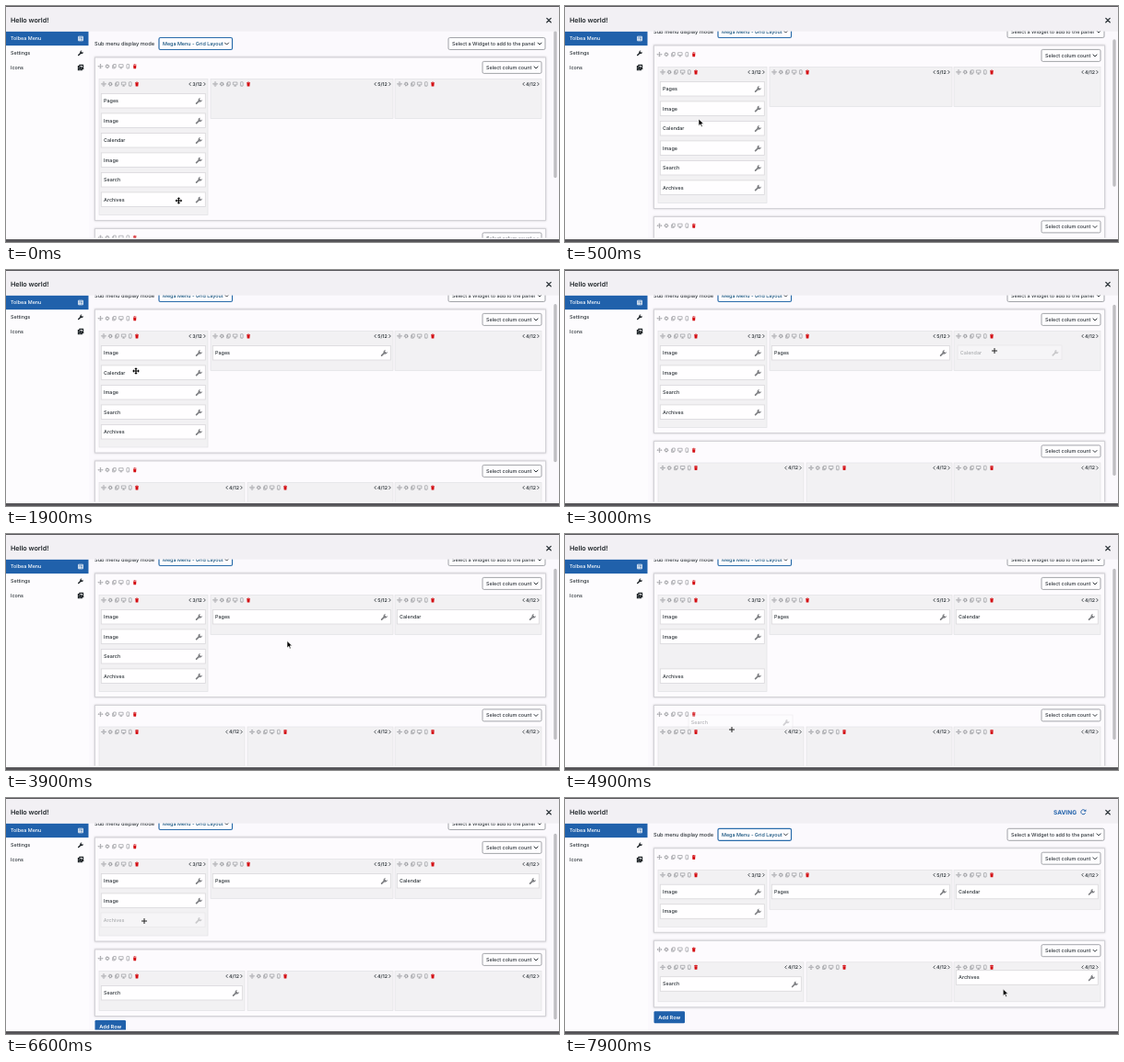
These frames come from a looping animation (600x257 px, 8000 ms). An HTML page:

```html
<!DOCTYPE html>
<html lang="en">
<head>
<meta charset="utf-8">
<title>Menu builder</title>
<style>
  html, body { margin: 0; width: 100%; height: 100%; overflow: hidden; background: #fff; }
  svg { display: block; width: 100vw; height: 100vh; }
  text { font: 450 5.4px Inter, "Liberation Sans", sans-serif; fill: #2c3338; text-rendering: geometricPrecision; }
  .mid { text-anchor: middle; }
  .bold { font-weight: 600; }
  .box { fill: #fffeff; stroke: #d9d8db; stroke-width: .8; }
  .select { fill: #fefdff; stroke: #8c8f94; stroke-width: .8; }
  .focus { stroke: #2a6cab; stroke-width: 1.2; }
  .focus + text { fill: #0a4b78; }
  .col { fill: #f2f1f3; stroke: #e2e1e4; stroke-width: .7; }
  .row { fill: #fdfbfe; stroke: #d3d2d7; stroke-width: 1; filter: drop-shadow(0 0 1px #0003); }
  .line { fill: none; stroke: #2c3338; stroke-linecap: round; stroke-linejoin: round; }
  .tool { fill: none; stroke: #96979b; stroke-width: .75; }
  .blue { fill: #2061ab; }
  .light { fill: #fff; }
</style>
</head>
<body>
<svg viewBox="0 0 600 257" preserveAspectRatio="none">
  <defs>
    <clipPath id="view"><rect x="90" y="27" width="510" height="225.5"/></clipPath>
    <g id="tools-cross" class="tool"><path d="M-2.6 0H2.6M0-2.6V2.6M-.9-1.8L0-2.7L.9-1.8M-.9 1.8L0 2.7L.9 1.8M-1.8-.9L-2.7 0L-1.8.9M1.8-.9L2.7 0L1.8.9"/></g>
    <g id="tools-gear" class="tool"><circle r="1.6" stroke-width="1"/><circle r="2.3" stroke-width=".8" stroke-dasharray=".9 .9"/></g>
    <g id="tools-copy" class="tool"><path d="M-.9-2.4H2V1.2H-.9ZM-1-1.2H-2V2.4H.9V1.4"/></g>
    <g id="tools-screen" class="tool"><path d="M-2.5-2.2H2.5V1H-2.5ZM0 1V2.4M-1.4 2.4H1.4"/></g>
    <g id="tools-phone" class="tool"><rect x="-1.5" y="-2.5" width="3" height="5" rx=".5"/><path d="M-.4 1.6H.4"/></g>
    <g id="tools-trash" fill="#d40f14"><path d="M-2.1-2.2H-.8L-.5-2.7H.5L.8-2.2H2.1V-1.5H-2.1ZM-1.8-1.1H1.8L1.5 2.7H-1.5Z"/></g>
    <g id="wrench">
      <path d="M-2.7 2.7L.9-.9" fill="none" stroke="currentColor" stroke-width="1.7" stroke-linecap="round"/>
      <path d="M1.8-3A2.1 2.1 0 1 0 3.3-1.4L2-.4L.7-.9L.6-2Z" fill="currentColor"/>
    </g>
    <path id="chevron" class="line" d="M-2-1L0 1L2-1"/>
  </defs>

  <rect width="600" height="257" fill="#57565a"/>
  <rect y="1" width="600" height="253" fill="#fbf9fd"/>

  <g clip-path="url(#view)">
    <g id="page"></g>
    <rect id="thumb" x="594.3" width="3.4" rx="1.7" fill="#bfbec2"/>
    <g id="ghost" opacity=".35"></g>
  </g>

  <rect y="27" width="90" height="227" fill="#fdfcfe"/>
  <rect y="27.6" width="89.5" height="15.5" class="blue"/>
  <text x="5" y="37.2" class="light">Tolbea Menu</text>
  <text x="5" y="53">Settings</text>
  <text x="5" y="68.8">Icons</text>
  <path d="M78.6 33.2H83.4V37.8H78.6ZM78.6 34.8H83.4M78.6 36.3H83.4M80.2 34.8V37.8" fill="none" stroke="#fff" stroke-width=".8"/>
  <use href="#wrench" transform="translate(81 51.2) scale(.85)" color="#1d2327"/>
  <path d="M79.8 64.4H83.6V68.4H79.8ZM79.4 65.6H78.4V69.8H82.4V69M79.8 68.2L81.4 66.3L83.4 68.2Z" fill="none" stroke="#1d2327" stroke-width="1.1"/>

  <rect y="1" width="600" height="26.6" fill="#f2f0f4"/>
  <text x="5" y="17.9" class="bold" style="font-size:7.2px;fill:#1d2327">Hello world!</text>
  <path d="M586.8 13.4L591.2 17.8M591.2 13.4L586.8 17.8" class="line" stroke-width="1.3"/>
  <g id="saving">
    <text x="530" y="17.7" class="blue" style="font-size:6.5px;font-weight:700">SAVING</text>
    <g id="spinner">
      <path d="M2.2-1.3A2.5 2.5 0 1 0 2.3 1" fill="none" stroke="#2061ab" stroke-width="1"/>
      <path d="M3.1-3V-.5H.6Z" class="blue"/>
    </g>
  </g>

  <g id="cursor">
    <path id="arrow" d="M0 0V7.4L1.8 5.8L3 8.4L4.2 7.9L3 5.3H5.4Z" fill="#000" stroke="#fff" stroke-width=".6"/>
    <g id="move">
      <path d="M-2.6 0H2.6M0-2.6V2.6" stroke="#fff" stroke-width="2.6"/>
      <path d="M0-3.8L1.7-2H.6V-.6H2V-1.7L3.8 0L2 1.7V.6H.6V2H1.7L0 3.8L-1.7 2H-.6V.6H-2V1.7L-3.8 0L-2-1.7V-.6H-.6V-2H-1.7Z" fill="#000" stroke="#fff" stroke-width=".5" paint-order="stroke"/>
    </g>
    <path id="plus" d="M-3 0H3M0-3V3" stroke="#222" stroke-width="1"/>
  </g>
</svg>

<script>
const LOOP = 8000, STEP = 100;
const ROW_TOP = 56, ROW_GAP = 9, COL_TOP = 23.5, PITCH = 21.5, COL_MIN = 43;
const $ = id => document.getElementById(id);

// Columns of both rows: [left, right, share]
const grid = [
  [[101, 219, 3], [222, 420, 5], [422, 581, 4]],
  [[101, 259, 4], [262, 420, 4], [422, 581, 4]]
];

// Widgets in their first order; those with a drag go to row/col
const widgets = [
  { name: 'Pages', start: 900, shift: 1200, drop: 1300, settle: 1800, row: 0, col: 1, grab: [38, 8] },
  { name: 'Image' },
  { name: 'Calendar', start: 2000, shift: 2500, drop: 3200, settle: 3700, row: 0, col: 2, grab: [40, 6] },
  { name: 'Image' },
  { name: 'Search', start: 4300, shift: 5100, drop: 5700, settle: 6300, row: 1, col: 0, grab: [47, 16] },
  { name: 'Archives', start: 6600, shift: 7300, drop: 7900, settle: 8500, row: 1, col: 2, grab: [47, 9] }
];

// Pointer stops: time, x, y, shape from then on
const stops = [
  [0, 187.4, 212, 'move'], [100, 187.4, 212, 'arrow'], [500, 145, 123, 'arrow'], [700, 141, 91, 'move'],
  [900, 141, 91, 'plus'], [1200, 266, 91, 'plus'], [1300, 268, 91, 'arrow'], [1800, 141, 110, 'move'],
  [2000, 141, 110, 'plus'], [2600, 464, 88, 'plus'], [2700, 466, 88, 'plus'], [3200, 466, 88, 'move'],
  [3700, 460, 92, 'arrow'], [4100, 150, 141, 'move'], [4300, 150, 141, 'plus'], [4900, 181, 213, 'plus'],
  [5200, 158, 216, 'plus'], [5500, 152, 212, 'plus'], [5700, 152, 212, 'arrow'], [5900, 148, 152, 'arrow'],
  [6300, 150, 134, 'move'], [6600, 150, 134, 'plus'], [7300, 470, 213, 'plus'], [7700, 475.3, 208, 'plus'],
  [7900, 475.3, 208, 'arrow'], [LOOP, 475.3, 208, 'arrow']
];

const rect = (cls, x, y, w, h, rx = 0) =>
  `<rect class="${cls}" x="${x}" y="${y}" width="${w}" height="${h}" rx="${rx}"/>`;
const text = (str, x, y, cls = '', size = 5.4) =>
  `<text class="${cls}" x="${x}" y="${y}" style="font-size:${size}px">${str}</text>`;
const use = (id, x, y, extra = '') => `<use href="#${id}" transform="translate(${x} ${y}) ${extra}"/>`;
const place = (el, x, y, extra = '') => el.setAttribute('transform', `translate(${x} ${y}) ${extra}`);
const show = (el, on) => { el.style.display = on ? '' : 'none'; };

const tools = (x, y, gap) => ['cross', 'gear', 'copy', 'screen', 'phone', 'trash']
  .map((name, i) => use('tools-' + name, x + i * gap, y, 'scale(.9)')).join('');

const select = (str, x, y, w, cls = '') =>
  rect('select ' + cls, x, y, w, 13, 1.5) + text(str, x + 4, y + 8.4) + use('chevron', x + w - 6, y + 6.6);

const card = (name, x, y, w) =>
  rect('box', x, y - 7.8, w, 15.6) + text(name, x + 2.8, y + 1.9) +
  `<g color="#7f8084">${use('wrench', x + w - 7, y + .3)}</g>`;

function column([left, right, share], top, height) {
  const y = top + 5.5, mid = right - 11.5;
  return rect('col', left, top, right - left, height) + tools(left + 5, y, 7.2) +
    text(share + '/12', mid, y + 1.9, 'mid bold', 5.2) +
    use('chevron', mid - 8, y, 'rotate(90) scale(.8)') + use('chevron', mid + 8, y, 'rotate(-90) scale(.8)');
}

function gridRow(r, top, t) {
  const cells = grid[r].map((_, c) => widgets.filter(w => {
    const moved = t >= w.shift;
    return (moved ? w.row : 0) === r && (moved ? w.col : 0) === c;
  }));
  const heights = cells.map(list => Math.max(COL_MIN, 19 + PITCH * list.length));
  const height = COL_TOP + Math.max(...heights) + 6;
  let html = rect('row', 96.5, top, 489, height) + tools(102.5, top + 9.7, 7.45) +
    select('Select colum count', 517, top + 4.4, 64);
  grid[r].forEach((col, c) => {
    html += column(col, top + COL_TOP, heights[c]);
    cells[c].forEach((w, i) => {
      if (t >= w.start && t < w.drop) return;
      const lift = t >= w.drop && t < w.settle ? 7 : 0;
      html += card(w.name, col[0] + 2.3, top + 47.2 + i * PITCH - lift, col[1] - col[0] - 5);
    });
  });
  return { html, bottom: top + height };
}

function pointer(t) {
  const i = stops.findIndex(s => s[0] > t);
  const a = stops[i - 1], b = stops[i];
  const p = (t - a[0]) / (b[0] - a[0]), k = p * p * (3 - 2 * p);
  return { x: a[1] + (b[1] - a[1]) * k, y: a[2] + (b[2] - a[2]) * k, shape: a[3] };
}

function draw(t) {
  const first = gridRow(0, ROW_TOP, t);
  const second = gridRow(1, first.bottom + ROW_GAP, t);
  const button = second.bottom + 4.5;
  const room = button - 232.3;
  const scroll = Math.min(room, 13 * Math.min(1, Math.max(0, (t - 100) / 400)));

  $('page').innerHTML = text('Sub menu display mode', 96, 43, '', 5.7) +
    select('Mega Menu - Grid Layout', 166, 34.5, 79.5, 'focus') +
    select('Select a Widget to add to the panel', 480, 34.5, 105) +
    first.html + second.html + rect('blue', 96.5, button, 33.5, 13, 1.2) +
    text('Add Row', 113.2, button + 8.5, 'mid light bold', 5.6);
  place($('page'), 0, -scroll);

  const track = 223, scale = track / (track + room);
  show($('thumb'), room > 2);
  $('thumb').setAttribute('y', 27 + scroll * scale);
  $('thumb').setAttribute('height', track * scale);

  const hand = pointer(t);
  place($('cursor'), hand.x, hand.y);
  for (const shape of ['arrow', 'move', 'plus']) show($(shape), shape === hand.shape);

  const held = widgets.find(w => t >= w.start && t < w.drop);
  show($('ghost'), held);
  if (held) {
    $('ghost').innerHTML = card(held.name, 0, 7.8, 113);
    place($('ghost'), hand.x - held.grab[0], hand.y - held.grab[1]);
  }

  const saved = widgets.find(w => t >= w.drop && t < w.settle);
  show($('saving'), saved);
  if (saved) place($('spinner'), 562.3, 15.3, `rotate(${(t - saved.drop) * .36})`);
}

let last = -1;
function tick() {
  const t = Math.floor(performance.now() % LOOP / STEP) * STEP;
  if (t !== last) draw(last = t);
  requestAnimationFrame(tick);
}
tick();
</script>
</body>
</html>
```
